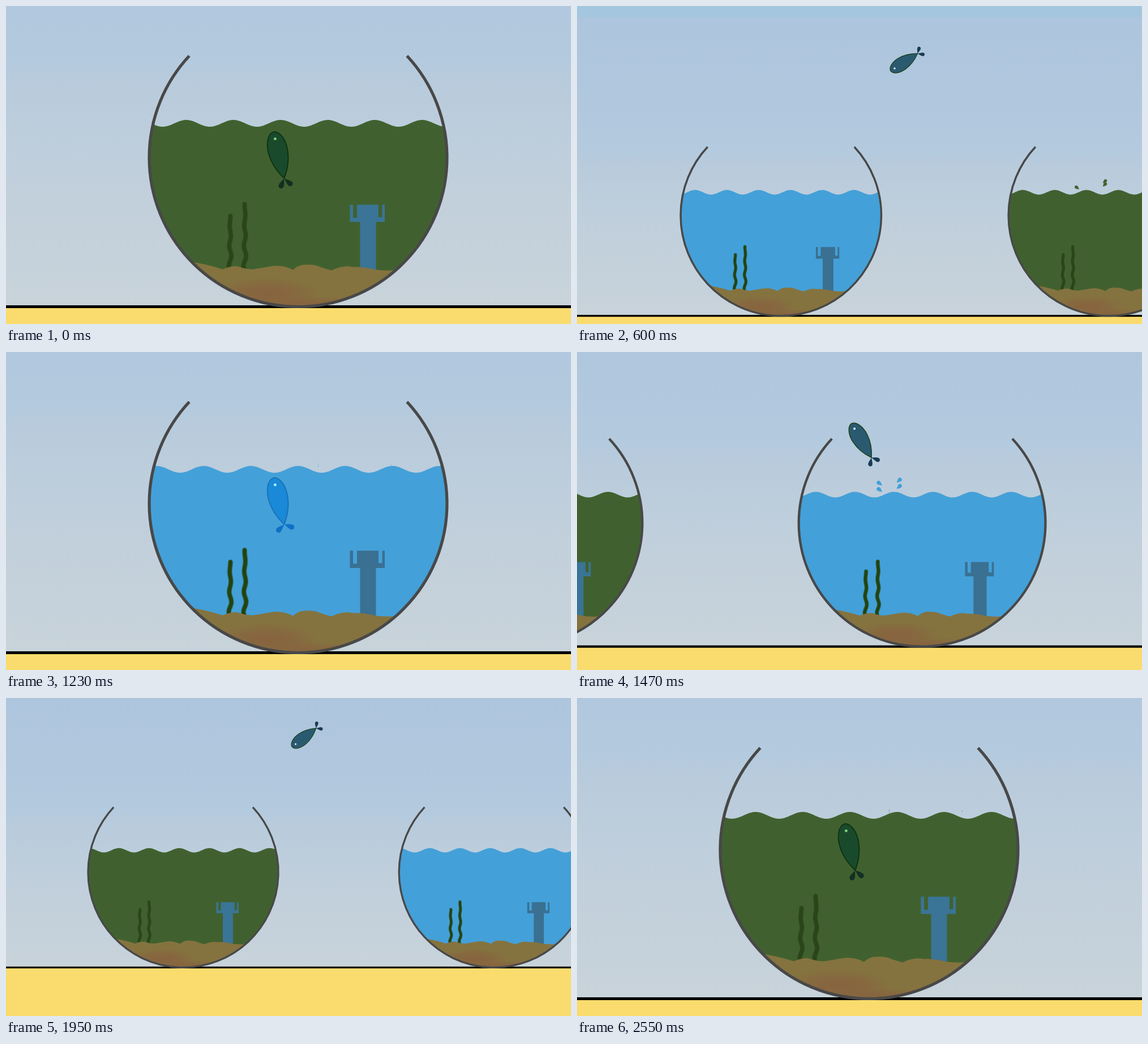
An HTML page with a canvas that plays this animation: 998 by 561 pixels, repeating every 2580 ms.

```html
<!DOCTYPE html>
<html lang="en">
<head>
<meta charset="utf-8">
<title>Jumping fish</title>
<style>
  html, body { margin: 0; width: 100%; height: 100%; overflow: hidden; background: #a5c6df; }
  canvas { display: block; }
</style>
</head>
<body>
<canvas id="stage" width="998" height="561"></canvas>
<script>
const ctx = document.getElementById('stage').getContext('2d');
const { PI, sin, cos, min, max } = Math;
const LOOP = 2580, STEP = 30;
const GAP = 859.5, R = 263, WAVE = 250 / 3;
const GROUND = 530.5, EYE = -17;
const REST = -4.5, APEX = -482, DEEP = 82, STEEP = 77;

// Each leap: camera pan, the fish's whole trip, time of the apex and of the deepest dive
const LEAPS = [
  { pan: [0, 820], trip: [0, 1160], apex: 435, dive: 870, lag: 134, zoom: .437, rise: 85, fall: 85 },
  { pan: [1331, 2306], trip: [1331, 2540], apex: 1770, dive: 2177, lag: 60, zoom: .396, rise: 7, fall: 74 }
];

const SPLASHES = [
  { from: 200, to: 720, bowl: 0, x: -47, near: 30, reach: 8, rise: 35, size: 14, sides: [1, 1, -1] },
  { from: 800, to: 1240, bowl: 1, x: 100, near: 31, reach: 34, rise: 60, size: 17, sides: [-1, 1, -1] },
  { from: 1410, to: 1860, bowl: 1, x: -70, near: 18, reach: 20, rise: 58, size: 14, sides: [1, -1, 1, -1] },
  { from: 2130, to: 2560, bowl: 2, x: 100, near: 31, reach: 34, rise: 60, size: 17, sides: [-1, 1, -1] }
];

const AIR = { body: '#2a5a70', line: '#1d4320', tail: '#183c54', eye: '#fff' };
const GREEN = {
  water: '#40612f', castle: '#3a7496', weed: '#2a4519',
  body: '#1a4a2c', line: '#0d3410', tail: '#122f22', eye: '#7fd07a'
};
const BLUE = {
  water: '#44a0d8', castle: '#3a7092', weed: '#23430f',
  body: '#1a89d7', line: '#1674b8', tail: '#1070c6', eye: '#a4ffff'
};

const BODY = new Path2D('M-42 0C-41-11-24-18-6-17C14-16 30-8 42 0C30 8 14 16-6 17C-24 18-41 11-42 0Z');
const LOBE = new Path2D('M0 0C6-2 11-5 15-4.5C20-4 20 4 15 4.5C11 5 6 2 0 0Z');
const DROP = new Path2D('M.5 0C.2 .1 0 .3-.22 .3C-.58 .3-.58-.3-.22-.3C0-.3 .2-.2 .5 0Z');
const CASTLE = new Path2D('M91.5 83h5.5v23h7v-23h38v22h6.5v-22h4.5v30.5h-15.5V205h-28v-91.5h-18Z');
const SAND = new Path2D('M-210 180Q-186 184-171 187T-133 197Q-116 190-106 192Q-92 197-80 197' +
  'Q-66 195-50 192Q-28 188-9 198Q2 188 13 189Q30 188 42 194L59 199Q80 189 96 193' +
  'Q112 192 129 196Q148 202 210 196V270H-210Z');

const lerp = (a, b, u) => a + (b - a) * u;
const progress = (t, from, to) => min(1, max(0, (t - from) / (to - from)));

function pose(t) {
  const index = t < LEAPS[1].pan[0] ? 0 : 1;
  const leap = LEAPS[index];
  const u = progress(t, ...leap.pan);
  const swing = sin(PI * u);
  const eye = EYE - GAP * (index + u - .009 * sin(2 * PI * u));
  const camera = {
    eye,
    zoom: 1 - leap.zoom * swing,
    ground: GROUND + leap.rise * swing - leap.fall * swing * swing
  };

  const fish = {
    x: eye + EYE + leap.lag * sin(PI * progress(t, ...leap.trip)),
    spread: 47.5 - 12.5 * cos(10 * PI * t / LOOP)
  };
  if (t < leap.dive) {
    const v = min(1, (leap.apex - t) / (leap.dive - leap.apex));
    fish.y = min(REST, lerp(APEX, DEEP, v * v));
    fish.tilt = STEEP * (v + .05 * sin(PI * v));
  } else {
    const w = 1 - (1 - progress(t, leap.dive, leap.trip[1])) ** 2;
    fish.y = lerp(DEEP, REST, w) + 100 * sin(PI * w);
    fish.tilt = lerp(-STEEP, STEEP, w);
  }
  return { camera, fish };
}

function placed(x, y, angle, draw) {
  ctx.save();
  ctx.translate(x, y);
  ctx.rotate(angle * PI / 180);
  draw();
  ctx.restore();
}

function drawFish(fish, look) {
  placed(fish.x, fish.y, fish.tilt, () => {
    ctx.fillStyle = look.tail;
    for (const side of [-1, 1]) placed(42, 0, side * fish.spread, () => ctx.fill(LOBE));
    ctx.fillStyle = look.body;
    ctx.strokeStyle = look.line;
    ctx.lineWidth = 2;
    ctx.fill(BODY);
    ctx.stroke(BODY);
    ctx.fillStyle = look.eye;
    ctx.beginPath();
    ctx.arc(-29.5, 0, 2.4, 0, 7);
    ctx.fill();
  });
}

function drawSplash({ from, to, x, near, reach, rise, size, sides }, t) {
  if (t < from || t >= to) return;
  const p = progress(t, from, to);
  const length = size * min(1, 5 * (1 - p));
  sides.forEach((side, i) => {
    const lift = 14 + rise * 4 * p * (1 - p) * (1 - i / sides.length);
    placed(x + side * (near + reach * p), -50 - lift, 90 + side * 50, () => {
      ctx.scale(length, length);
      ctx.fill(DROP);
    });
  });
}

function waterPath(shift) {
  const path = new Path2D();
  path.moveTo(-R, R);
  for (let x = -R; x <= R; x += 3) {
    path.lineTo(x, -60.5 - 6 * cos((x + 31 - shift) / WAVE * 2 * PI));
  }
  path.lineTo(R, R);
  path.closePath();
  return path;
}

function drawWeed(x, top, colour) {
  ctx.beginPath();
  for (let y = top; y <= 196; y += 2) {
    const sway = .5 + 2 * progress(y, top, 191);
    ctx.lineTo(x - sway * cos((y - 191) / 36 * 2 * PI), y);
  }
  ctx.strokeStyle = colour;
  ctx.lineCap = ctx.lineJoin = 'round';
  ctx.globalAlpha = .5;
  ctx.lineWidth = 9;
  ctx.stroke();
  ctx.globalAlpha = 1;
  ctx.lineWidth = 6.5;
  ctx.stroke();
}

function glow(x, y, rx, ry) {
  ctx.save();
  ctx.translate(x, y);
  ctx.scale(rx, ry);
  const g = ctx.createRadialGradient(0, 0, 0, 0, 0, 1);
  g.addColorStop(0, 'rgba(136,97,63,.9)');
  g.addColorStop(.5, 'rgba(136,97,63,.6)');
  g.addColorStop(1, 'rgba(136,97,63,0)');
  ctx.fillStyle = g;
  ctx.fillRect(-1, -1, 2, 2);
  ctx.restore();
}

function drawBowl(index, fish, shift, t) {
  const look = index % 2 ? BLUE : GREEN;
  ctx.save();
  ctx.translate(-index * GAP, 0);

  ctx.fillStyle = look.water;
  SPLASHES.filter(s => s.bowl === index).forEach(s => drawSplash(s, t));

  ctx.save();
  ctx.beginPath();
  ctx.arc(0, 0, R, 0, 7);
  ctx.clip();
  const water = waterPath(shift);
  ctx.fill(water);
  ctx.fillStyle = look.castle;
  ctx.fill(CASTLE);
  drawWeed(-120, 103, look.weed);
  drawWeed(-94, 82, look.weed);
  ctx.save();
  ctx.clip(water);
  drawFish({ ...fish, x: fish.x + index * GAP }, look);
  ctx.restore();
  ctx.fillStyle = '#84733f';
  ctx.fill(SAND);
  ctx.clip(SAND);
  glow(-55, 240, 95, 30);
  glow(30, 262, 110, 18);
  ctx.restore();

  const rim = .239 * PI;
  ctx.beginPath();
  ctx.arc(0, 0, R, -rim, PI + rim);
  ctx.strokeStyle = '#484848';
  ctx.lineWidth = 5.2;
  ctx.stroke();
  ctx.restore();
}

const sky = ctx.createLinearGradient(0, -782, 0, 0);
[[0, '#adc5dd'], [.33, '#b1c8de'], [.45, '#b4cade'], [.49, '#b8cbdc'], [.68, '#c0cfdc'], [1, '#c8d3da']]
  .forEach(([at, colour]) => sky.addColorStop(at, colour));

function strip(y, height, fill) {
  ctx.fillStyle = fill;
  ctx.fillRect(-5000, y, 10000, height);
}

function render(t) {
  const { camera: { eye, zoom, ground }, fish } = pose(t);
  const p = t / LOOP;
  const shift = 3 * WAVE * p - 5 * sin(PI * p) ** 2;

  ctx.setTransform(1, 0, 0, 1, 0, 0);
  strip(0, 561, '#a5c6df');
  ctx.setTransform(zoom, 0, 0, zoom, 499 - zoom * eye, ground);
  strip(-782, 782, sky);
  strip(0, 1000, '#fadc6e');
  strip(-2.5, 5, '#000');

  ctx.translate(0, -263);
  drawFish(fish, AIR);
  for (let i = -1; i <= 3; i++) drawBowl(i, fish, shift, t);
}

const start = performance.now();
function tick() {
  const t = (performance.now() - start) % LOOP;
  render(Math.floor(t / STEP) * STEP);
  requestAnimationFrame(tick);
}
tick();
</script>
</body>
</html>
```
